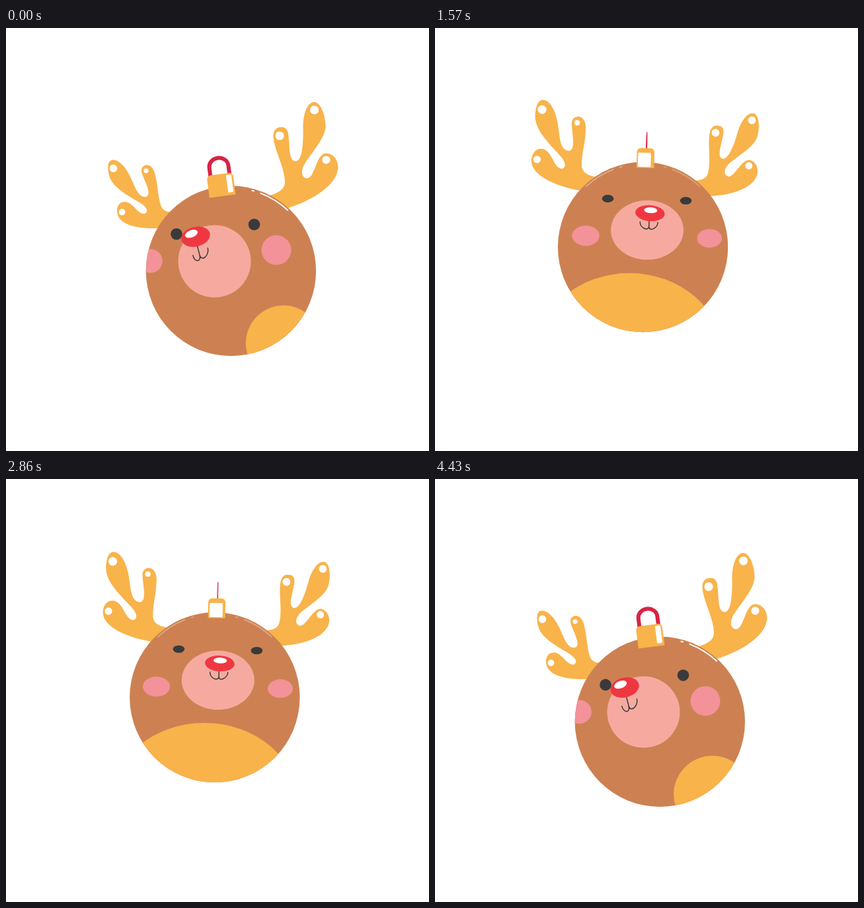
An HTML page with a canvas for the animation above (4.5 s loop, 640 px wide and 640 px high).

```html
<!DOCTYPE html>
<html lang="en">
<head>
<meta charset="utf-8">
<title>Reindeer bauble</title>
<style>
  html, body { margin: 0; width: 100%; height: 100%; overflow: hidden; background: #fff; }
  canvas { display: block; }
</style>
</head>
<body>
<canvas id="stage" width="640" height="640"></canvas>
<script>
const ctx = document.getElementById('stage').getContext('2d');
const LOOP = 4500, STEPS = 63, SWING = 31.25;
const RADIUS = 128.7, DEG = Math.PI / 180;
const BROWN = '#cd8152', GOLD = '#f8b34b', BLUSH = '#f39299', MUZZLE = '#f6aa9f',
      NOSE = '#ef3742', DARK = '#3a3a3c', RING = '#d72444', WHITE = '#fff';

// Each part has three poses: leaning right, near the middle, leaning left.
// Columns: x, y, rx, ry, tilt in degrees.
const NODES = [1, -0.256, -0.902];
const PARTS = {
  muzzle: [[315.5, 353, 55, 0, 0], [321, 305.5, 55, 0, 0], [324, 342.5, 55, 0, 0]],
  nose: [[287, 315.7, 22, 15, -14], [325, 280, 22.3, 12, 4], [347, 309, 22, 14, 14]],
  shine: [[280.5, 311.4, 10, 5.5, -20], [326, 275.5, 10, 4.4, 3], [352, 305.5, 9.6, 5, 15]],
  eyeL: [[258, 311.7, 8.8, 8.8, 0], [261.5, 258, 8.8, 5.8, 0], [263.4, 287, 8.8, 8.7, 0]],
  eyeR: [[375.5, 297.2, 8.8, 8.8, 0], [379.5, 261, 8.8, 5.8, 0], [381, 299.7, 8.8, 8.7, 0]],
  cheekL: [[218.5, 352.6, 18.3, 18, 0], [228, 314.2, 20.7, 15.3, 0], [233, 327.5, 22.3, 21, 0]],
  cheekR: [[409, 336, 22.5, 22.5, 0], [415.3, 318, 18.9, 14, 0], [418, 342, 17, 16, 0]],
};
const BODY = [[340.4, 367.5], [314.8, 331.3], [300.7, 360.6]];
const BELLY = [[420, 477], [295, 491], [225, 493.5]];

// Cap: x, y, width, height, tilt; stripe: offset x, offset y, width, height.
const CAP = [[325.5, 237.7, 40, 33.5, -7.5], [318.6, 196.5, 26.5, 30, 1.5], [314.9, 229, 37.5, 34, 6]];
const STRIPE = [[13.2, -0.6, 8, 26.5], [-1.5, 2.8, 19.5, 21.5], [-9.7, 0.8, 10.5, 25]];
// Ring: base x, base y, half width, height, line width.
const LOOP_RING = [[323.5, 221, 14.5, 24.5, 6], [320, 183, 0.5, 26, 1], [318, 213, 11, 24, 5]];

// Mouth points: stem top, join, left end, right end.
const MOUTH = [
  [289.5, 330, 293, 343.5, 282.7, 344, 305.3, 333],
  [323.7, 291, 323.5, 299.5, 310, 293, 337, 294],
  [345.2, 322, 342.5, 335, 330.2, 325, 354.5, 334.5],
];

// Antlers are drawn in the pose "rest" and carried by their three white dots.
const ANTLERS = [
  {
    rest: 1, dots: [6.6, 4.1, 5.6],
    poses: [[162.5, 212.5, 212, 216, 175.5, 278.5],
            [162, 123.5, 215, 143.5, 154.5, 199],
            [170, 125, 222, 155.5, 149, 203]],
    path: new Path2D('M163 109C172 109 181 121 185 141C189 160 187 184 202 186C214 185 207 160 207 147' +
      'C206 138 211 134 217 134C225 135 229 143 228 155C227 175 222 190 222 207C222 219 232 223 243 225' +
      'L258 227L240 249L219 246C185 240 146 224 146 201C146 191 152 183 160 183C178 183 178 212 192 213' +
      'C200 211 197 202 190 194C178 180 152 157 151.5 135C151.5 120 156 109 163 109Z'),
  },
  {
    rest: 0, dots: [6.6, 6.6, 6.1],
    poses: [[466.5, 124, 414, 163, 484.5, 199.5],
            [479.5, 139, 424.5, 158, 475, 208],
            [478.5, 198, 425, 207.5, 464, 261]],
    path: new Path2D('M466 112C456 113 449 129 449.5 153C450 175 448 202 438 201.5C427 201 430 178 427 160' +
      'C426 153 422 149.5 417 150C408 150 404 156 404.5 165C406 185 422 212 422 233C422 244 413 249 398 254' +
      'L385 258L405 282L428 272C465 260 502 237 502.5 210C502 198 494 190 485 189.5C469 189 468 226 456 227.5' +
      'C447 227 446 217 451 207C461 190 484 166 483.5 148C483 129 475 112 466 112Z'),
  },
];

let weights = [1, 0, 0];

// Quadratic blend through the three poses.
function setLean(lean) {
  weights = NODES.map((n, i) => NODES.reduce(
    (w, m, j) => i === j ? w : w * (lean - m) / (n - m), 1));
}
const blend = poses => poses[0].map((_, i) =>
  poses.reduce((sum, pose, k) => sum + pose[i] * weights[k], 0));
const clamp = v => Math.min(1, Math.max(0, v));

function oval(x, y, rx, ry, tilt, color) {
  ctx.fillStyle = color;
  ctx.beginPath();
  ctx.ellipse(x, y, Math.abs(rx), Math.abs(ry), tilt * DEG, 0, 2 * Math.PI);
  ctx.fill();
}
const part = (name, color) => oval(...blend(PARTS[name]), color);

const basis = p => new DOMMatrix([p[2] - p[0], p[3] - p[1], p[4] - p[0], p[5] - p[1], p[0], p[1]]);

function drawAntler({ rest, dots, poses, path }) {
  const home = poses[rest];
  ctx.save();
  ctx.setTransform(basis(blend(poses)).multiply(basis(home).inverse()));
  ctx.fillStyle = GOLD;
  ctx.fill(path);
  dots.forEach((r, i) => oval(home[2 * i], home[2 * i + 1], r, r, 0, WHITE));
  ctx.restore();
}

function drawMouth(tilt, squash) {
  const [sx, sy, jx, jy, lx, ly, rx, ry] = blend(MOUTH);
  const depth = 11.5 - 2.5 * squash;
  const dx = -Math.sin(tilt * DEG) * depth, dy = Math.cos(tilt * DEG) * depth;
  ctx.strokeStyle = DARK;
  ctx.lineWidth = 1.5;
  ctx.lineCap = 'round';
  ctx.beginPath();
  ctx.moveTo(sx, sy);
  ctx.lineTo(jx, jy);
  for (const [x, y] of [[lx, ly], [rx, ry]]) {
    ctx.moveTo(x, y);
    ctx.bezierCurveTo(x + dx, y + dy, jx + dx, jy + dy, jx, jy);
  }
  ctx.stroke();
}

function drawGloss(x, y, side, alpha) {
  ctx.save();
  ctx.translate(x, y);
  ctx.scale(side, 1);
  ctx.globalAlpha = alpha;
  ctx.strokeStyle = WHITE;
  ctx.lineWidth = 2;
  ctx.lineCap = 'round';
  for (const [from, to] of [[-69, -47], [-75.2, -74]]) {
    ctx.beginPath();
    ctx.arc(0, 0, 125.7, from * DEG, to * DEG);
    ctx.stroke();
  }
  ctx.restore();
}

function drawCap() {
  const [x, y, w, h, tilt] = blend(CAP);
  const [sx, sy, sw, sh] = blend(STRIPE);
  const [bx, by, half, tall, line] = blend(LOOP_RING);
  const hw = Math.max(0.4, Math.abs(half)), top = 13;

  ctx.save();
  ctx.translate(bx, by);
  ctx.rotate(tilt * DEG);
  ctx.strokeStyle = RING;
  ctx.lineWidth = Math.max(0.8, line);
  ctx.lineCap = 'butt';
  ctx.beginPath();
  ctx.moveTo(-hw, 2);
  ctx.lineTo(-hw, top - tall);
  ctx.ellipse(0, top - tall, hw, top, 0, Math.PI, 2 * Math.PI);
  ctx.lineTo(hw, 2);
  ctx.stroke();
  ctx.restore();

  ctx.save();
  ctx.translate(x, y);
  ctx.rotate(tilt * DEG);
  ctx.fillStyle = GOLD;
  ctx.beginPath();
  ctx.roundRect(-w / 2, -h / 2, w, h, [6, 6, 0, 0]);
  ctx.fill();
  ctx.fillStyle = WHITE;
  ctx.beginPath();
  ctx.roundRect(sx - sw / 2, sy - sh / 2, sw, sh, 1);
  ctx.fill();
  ctx.restore();
}

function draw(step) {
  const angle = 2 * Math.PI * (step + 0.1) / SWING;
  const lean = Math.cos(angle), lift = Math.abs(Math.sin(angle));
  setLean(lean);
  ctx.fillStyle = WHITE;
  ctx.fillRect(0, 0, 640, 640);

  ANTLERS.forEach(drawAntler);
  const [x, y] = blend(BODY);
  oval(x, y, RADIUS, RADIUS, 0, BROWN);

  ctx.save();
  ctx.beginPath();
  ctx.arc(x, y, RADIUS, 0, 2 * Math.PI);
  ctx.clip();
  const swell = lift ** 1.6;
  oval(...blend(BELLY), 57 + 88 * swell, 57 + 67 * swell, 0, GOLD);
  part('cheekL', BLUSH);
  part('cheekR', BLUSH);
  const [mx, my, mrx] = blend(PARTS.muzzle);
  oval(mx, my, mrx, 54.9 - 10.4 * lift, 0, MUZZLE);
  part('eyeL', DARK);
  part('eyeR', DARK);
  drawMouth(blend(PARTS.nose)[4], lift);
  part('nose', NOSE);
  part('shine', WHITE);
  ctx.restore();

  drawGloss(x, y, 1, clamp((lean + 0.55) / 1.2));
  drawGloss(x, y, -1, clamp(-lean / 0.8));
  drawCap();
}

const start = performance.now();
function tick() {
  const t = (performance.now() - start) % LOOP;
  draw(Math.floor((t + 5) * STEPS / LOOP) % STEPS);
  requestAnimationFrame(tick);
}
tick();
</script>
</body>
</html>
```
